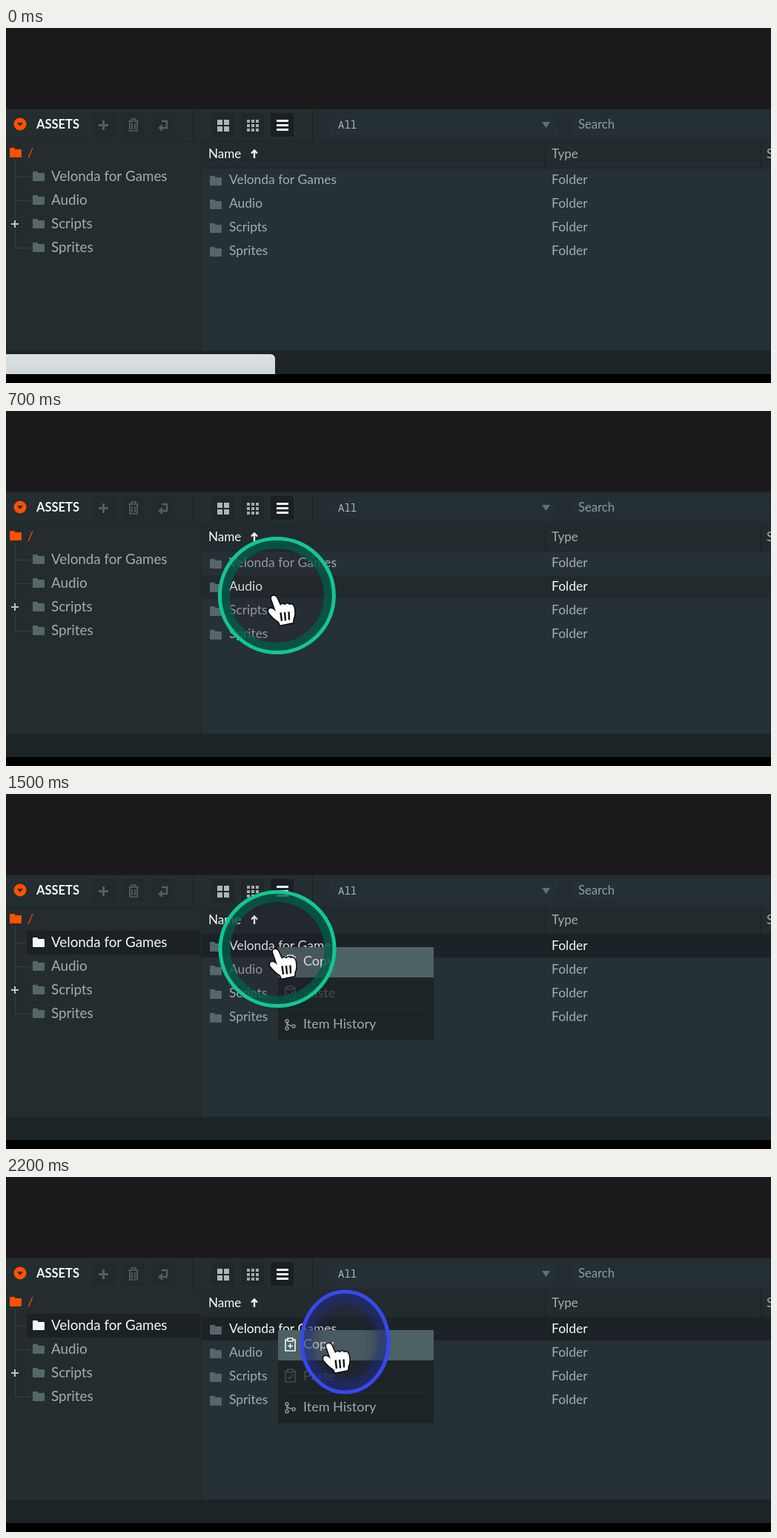
An HTML page with a canvas for the animation above (2.3 s loop, 1032 by 480 pixels).

```html
<!DOCTYPE html>
<html lang="en">
<head>
<meta charset="utf-8">
<title>Assets panel</title>
<style>
html, body { margin: 0; width: 100%; height: 100%; overflow: hidden; background: #000; }
canvas { display: block; }
</style>
</head>
<body>
<canvas id="stage" width="1032" height="480"></canvas>
<script>
const ctx = document.getElementById('stage').getContext('2d');
const LOOP = 2300, STEP = 100;
const SANS = 'Lato, "Open Sans", sans-serif';
const MONO = '"Noto Sans Mono", "DejaVu Sans Mono", monospace';
const NAMES = ['Velonda for Games', 'Audio', 'Scripts', 'Sprites'];
const GREY = '#a4acae', WHITE = '#f6f8f8', ORANGE = '#ff5000', ICON = '#566769';

// Pointer tip: time, x, y
const PATH = [
  [100, 393, 188], [200, 388, 209], [300, 383, 219], [400, 376, 238],
  [500, 368, 252], [600, 363, 249], [700, 362, 249], [800, 363, 214],
  [900, 363, 213], [1100, 363, 210], [1300, 363, 209], [1500, 364, 209],
  [1600, 375, 209], [1700, 389, 211], [1800, 404, 215], [1900, 419, 220],
  [2000, 430, 223], [2100, 435, 224], [2200, 436, 224]
];

function tipAt(t) {
  if (t <= PATH[0][0]) return PATH[0].slice(1);
  for (let i = 1; i < PATH.length; i++) {
    const [t0, x0, y0] = PATH[i - 1], [t1, x1, y1] = PATH[i];
    if (t <= t1) {
      const k = (t - t0) / (t1 - t0);
      return [x0 + (x1 - x0) * k, y0 + (y1 - y0) * k];
    }
  }
  return PATH[PATH.length - 1].slice(1);
}

function box(x, y, w, h, color, r = 0) {
  ctx.fillStyle = color;
  ctx.beginPath();
  ctx.roundRect(x, y, w, h, r);
  ctx.fill();
}

function text(s, x, y, size, color = GREY, weight = 400, family = SANS) {
  ctx.font = `${weight} ${size}px ${family}`;
  ctx.fillStyle = color;
  ctx.fillText(s, x, y);
}

function shape(points, color) {
  ctx.fillStyle = color;
  ctx.beginPath();
  points.forEach(([x, y]) => ctx.lineTo(x, y));
  ctx.fill();
}

function stroke(d, color, width, x = 0, y = 0) {
  ctx.save();
  ctx.translate(x, y);
  ctx.strokeStyle = color;
  ctx.lineWidth = width;
  ctx.stroke(new Path2D(d));
  ctx.restore();
}

function folder(x, y, color) {
  box(x, y, 7, 5, color, 1);
  box(x, y + 2, 16, 11, color, 1);
}

function toolbar() {
  box(0, 109.5, 1032, 43.5, '#242d2f');
  for (const x of [252, 413]) box(x, 110, 1, 42, '#1b2224');
  box(0, 152, 1032, 1, '#1e2628');

  ctx.fillStyle = ORANGE;
  ctx.beginPath();
  ctx.arc(19, 130, 8.5, 0, 7);
  ctx.fill();
  shape([[15, 128], [23, 128], [19, 133]], '#242d2f');
  text('ASSETS', 41, 136, 16.5, WHITE, 700);

  for (const x of [116, 156, 197]) box(x, 115, 31, 32, '#222a2c', 2);
  const dim = '#526062';
  box(125, 130, 13, 3, dim);
  box(130, 125, 3, 13, dim);
  stroke('M0 3H14M4 3V0H10V3M2 4V16H12V4M5 6V14M9 6V14', dim, 1.7, 165, 123);
  stroke('M5 0H12V9H2M6 5L2 9L6 13', dim, 2.4, 205, 126);

  box(277, 115, 31, 32, '#20282a', 2);
  box(317, 115, 31, 32, '#20282a', 2);
  box(357, 115, 31, 32, '#191f22', 2);
  for (let i = 0; i < 4; i++)
    box(285 + (i % 2) * 9, 124 + (i >> 1) * 9, 7, 7, '#aeb7b8');
  for (let i = 0; i < 9; i++)
    box(325 + (i % 3) * 6, 124 + Math.floor(i / 3) * 6, 4, 4, '#a2abad');
  for (let i = 0; i < 3; i++) box(365, 124 + i * 6, 16, 3, WHITE);

  box(437, 117, 307, 28, '#253034', 2);
  box(763, 117, 280, 28, '#253034', 2);
  text('All', 448, 136, 14, '#b0b8ba', 400, MONO);
  shape([[723, 127], [734, 127], [728.5, 135]], '#627173');
  text('Search', 772, 136, 16.7, '#909b9e');
}

function tree(selected) {
  box(0, 153, 264, 284, '#242c2e');
  folder(5, 162, ORANGE);
  text('/', 29, 175, 18, ORANGE);
  const line = '#353f41';
  box(12, 179, 1, 77, line);
  box(12, 273, 1, 24, line);
  for (const y of [201, 233, 297]) box(12, y, 22, 1, line);
  box(7, 264, 10, 2, '#bcc4c5');
  box(11, 260, 2, 10, '#bcc4c5');
  if (selected) box(28, 185, 234, 32, '#1b2124');
  NAMES.forEach((name, i) => {
    const on = selected && i === 0, y = 201 + i * 32;
    folder(36, y - 7, on ? WHITE : ICON);
    text(name, 61, y + 6, 18.8, on ? WHITE : GREY);
  });
}

function table(hover, selected) {
  box(264, 153, 768, 284, '#253135');
  box(264, 153, 768, 36, '#222b2e');
  box(264, 189, 768, 1, '#1c2426');
  box(263, 153, 1, 284, '#1e2628');
  for (const x of [727, 1018]) box(x, 153, 1, 36, '#1a2123');
  text('Name', 273, 176, 17.1, WHITE);
  stroke('M4 12V2M0 5.5L4 1.5L8 5.5', WHITE, 2.4, 331, 164);
  text('Type', 736, 176, 17);
  text('Size', 1026, 176, 17);
  NAMES.forEach((name, i) => {
    const y = 205 + i * 32, on = hover === i || (selected && i === 0);
    if (on) box(264, y - 15, 768, 31, selected && i === 0 ? '#1c2225' : '#212a2c');
    folder(275, y - 5, ICON);
    text(name, 301, y + 6, 17.4, on ? WHITE : GREY);
    text('Folder', 736, y + 6, 17.5, on ? WHITE : GREY);
  });
}

function clipboard(x, y, mark, color) {
  stroke('M4 2H1V17H14V2H11M4 0H11V4H4Z' + mark, color, 1.6, x, y);
}

function menu() {
  box(367, 207, 210, 126, '#1d2426', 1);
  box(367, 207, 210, 41, '#4d6265', 1);
  box(377, 291, 190, 1, '#262e30');
  clipboard(376, 218, 'M7.5 7V14M4 10.5H11', WHITE);
  text('Copy', 401, 232, 18, WHITE);
  clipboard(376, 260, 'M4 10L7 13L11 7', '#434d50');
  text('Paste', 401, 275, 18, '#434d50');
  stroke('M3 5V11M3 6Q4 10 9 10', '#8f999b', 1.5, 376, 303);
  for (const [x, y] of [[379, 307], [379, 317], [388, 314]]) {
    ctx.strokeStyle = '#8f999b';
    ctx.lineWidth = 1.5;
    ctx.beginPath();
    ctx.arc(x, y, 2, 0, 7);
    ctx.stroke();
  }
  text('Item History', 401, 317, 18, '#a0a9ab');
}

function oval(x, y, rx, ry) {
  ctx.beginPath();
  ctx.ellipse(x, y, rx, ry, 0, 0, 7);
}

function greenRing(x, y) {
  oval(x, y, 64, 64);
  ctx.fillStyle = 'rgba(44,26,42,.14)';
  ctx.fill();
  oval(x, y, 69.5, 69.5);
  ctx.strokeStyle = 'rgba(4,88,74,.82)';
  ctx.lineWidth = 12;
  ctx.stroke();
  oval(x, y, 77, 77);
  ctx.strokeStyle = '#12c792';
  ctx.lineWidth = 5;
  ctx.stroke();
}

function blueRing(x, y) {
  ctx.save();
  ctx.translate(x, y);
  ctx.scale(59 / 68, 1);
  const g = ctx.createRadialGradient(0, 0, 30, 0, 0, 68);
  g.addColorStop(0, 'rgba(32,36,60,.12)');
  g.addColorStop(.42, 'rgba(32,38,85,.3)');
  g.addColorStop(.62, 'rgba(33,43,115,.6)');
  g.addColorStop(1, 'rgba(34,44,125,.7)');
  oval(0, 0, 68, 68);
  ctx.fillStyle = g;
  ctx.fill();
  ctx.restore();
  oval(x, y, 58.5, 68);
  ctx.strokeStyle = '#3748ee';
  ctx.lineWidth = 5;
  ctx.stroke();
}

const HAND = new Path2D(
  'M5 5Q4.5 1 8 1Q11 1 12.5 4L17 14Q20 10.5 23 13.5Q26 10 29 13' +
  'Q34 11 35.5 17Q37.5 26 34.5 32L34 37L17 40.5L15 36Q8 32 1.5 23.5Q0 18.5 4 18' +
  'Q7 18 11 22Z');

function hand(x, y) {
  ctx.save();
  ctx.translate(x - 9, y);
  ctx.lineJoin = 'round';
  ctx.strokeStyle = '#080a0b';
  ctx.lineWidth = 3;
  ctx.stroke(HAND);
  ctx.fillStyle = '#fff';
  ctx.fill(HAND);
  ctx.restore();
  stroke('M17.5 23.5L19 35M23 23L24 34.5M28.5 22.5L29 33.5', '#101314', 2.4, x - 9, y);
}

function draw(t) {
  const shown = t >= 100, selected = t >= 1300, open = t >= 1500;
  const [x, y] = tipAt(t);
  const row = Math.floor((y - 189) / 32);
  const hover = shown && !open ? row : -1;

  box(0, 0, 1032, 480, '#1b191c');
  toolbar();
  tree(selected);
  table(hover, selected);
  box(0, 437, 1032, 31, '#1c2427');
  box(0, 436, 1032, 1, '#202a2d');
  box(0, 468, 1032, 12, '#000');
  if (open) menu();

  if (!shown) {
    const g = ctx.createLinearGradient(0, 441, 0, 468);
    g.addColorStop(0, '#dce2e4');
    g.addColorStop(1, '#cfd6d9');
    box(0, 441, 363, 27, g, [0, 6, 0, 0]);
    return;
  }
  if ((t >= 1300 && t < 1500) || t >= 2200) {
    blueRing(x + 21.5, y - 1);
  } else {
    // The ring trails the pointer
    const [rx, ry] = tipAt(t - 90);
    greenRing(rx + 2.5, ry + 0.5);
  }
  hand(x, y);
}

const start = performance.now();
function tick() {
  const t = (performance.now() - start) % LOOP;
  draw(Math.floor(t / STEP) * STEP);
  requestAnimationFrame(tick);
}
tick();
</script>
</body>
</html>
```
